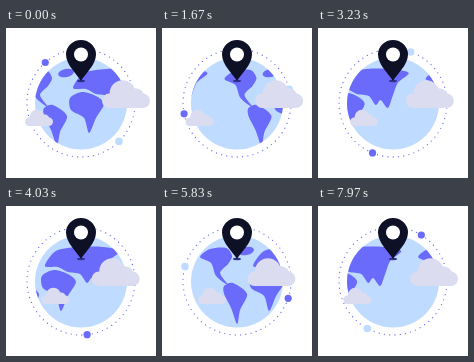
Animation of 150x150 px, one loop 8 s. Source, as an HTML page with a canvas:

```html
<!DOCTYPE html>
<html lang="en">
<head>
<meta charset="utf-8">
<title>Spinning globe</title>
<style>
  html, body { margin: 0; width: 100%; height: 100%; overflow: hidden; background: #fff; }
  canvas { display: block; width: 150px; height: 150px; }
</style>
</head>
<body>
<canvas id="stage"></canvas>
<script>
const SIZE = 150, LOOP = 8000;
const CX = 75, CY = 75, GLOBE_Y = 75.5, GLOBE_R = 46, ORBIT_R = 54;
const MAP_W = 145, SPIN_MS = 5000, DRIFT_MS = 10000, HOP_MS = 2000;
const SEA = '#bfdbff', LAND = '#6a6bfa', CLOUD = '#dcdcf0', INK = '#0e1026';
const TAU = Math.PI * 2;

const canvas = document.getElementById('stage');
const ctx = canvas.getContext('2d');
const ratio = window.devicePixelRatio || 1;
canvas.width = canvas.height = SIZE * ratio;

// Closed Catmull-Rom curve through a few coast points.
function coast(text) {
  const pts = text.split(' ').map(p => p.split(',').map(Number));
  const at = i => pts[(i + pts.length) % pts.length];
  const handle = (i, dir) => at(i).map((v, k) => v + dir * (at(i + 1)[k] - at(i - 1)[k]) / 7);
  const path = new Path2D();
  path.moveTo(...at(0));
  pts.forEach((_, i) => path.bezierCurveTo(...handle(i, 1), ...handle(i + 1, -1), ...at(i + 1)));
  return path;
}

const land = new Path2D();
land.ellipse(60, 45, 8, 4, -0.2, 0, TAU);
[
  '14,51 24,43 40,42 46,50 42,58 34,67 42,79 30,70 25,57',
  '38,80 47,77 61,88 54,104 51,118 45,102 38,88',
  '64,70 76,64 90,68 98,76 90,90 83,105 78,90 65,82',
  '67,60 78,45 100,41 125,41 142,45 131,55 126,68 121,80 114,72 109,77 102,68 90,66 80,61'
].forEach(text => land.addPath(coast(text)));

// The pin's tip sits at the origin.
const pin = new Path2D('M0 0C-4 -7 -15 -16 -15 -26.5A15 14.5 0 0 1 15 -26.5C15 -16 4 -7 0 0Z');

function disc(x, y, r, color) {
  ctx.fillStyle = color;
  ctx.beginPath();
  ctx.arc(x, y, r, 0, TAU);
  ctx.fill();
}

const ease = p => (1 - Math.cos(Math.PI * Math.min(1, Math.max(0, p)))) / 2;

function drawOrbit(t) {
  const turn = TAU * (0.635 - t / DRIFT_MS);
  const place = (angle, r, color) =>
    disc(CX + ORBIT_R * Math.cos(angle), CY + ORBIT_R * Math.sin(angle), r, color);
  const dots = 64;
  for (let i = 0; i < dots; i++) place(turn + TAU * i / dots, 0.65, LAND);
  place(turn, 3.6, LAND);
  place(turn + TAU * 0.491, 3.8, SEA);
}

function drawGlobe(t) {
  disc(CX, GLOBE_Y, GLOBE_R, SEA);
  ctx.save();
  ctx.clip();
  ctx.fillStyle = LAND;
  ctx.translate(MAP_W * (t / SPIN_MS % 1) - MAP_W, 0);
  for (let i = 0; i < 3; i++) {
    ctx.fill(land);
    ctx.translate(MAP_W, 0);
  }
  ctx.restore();
}

function drawPin(t) {
  const p = t % HOP_MS;
  const lift = p < 400 ? ease((p - 200) / 200) : 1 - ease((p - 400) / 500);
  ctx.save();
  ctx.globalAlpha = 1 - lift;
  ctx.fillStyle = '#30318c';
  ctx.beginPath();
  ctx.ellipse(CX, 53, 4, 1.2, 0, 0, TAU);
  ctx.fill();
  ctx.globalAlpha = 1;
  ctx.translate(CX, 53 - 6 * lift);
  ctx.scale(1, 1 + 0.12 * lift);
  ctx.fillStyle = INK;
  ctx.fill(pin);
  disc(0, -26.5, 7, '#fff');
  ctx.restore();
}

// A rounded bar with two humps, all sized from the cloud's width.
function drawCloud(x, bottom, w) {
  const barH = w * 0.3;
  ctx.fillStyle = CLOUD;
  ctx.beginPath();
  ctx.roundRect(x, bottom - barH, w, barH, barH / 2);
  ctx.fill();
  disc(x + w * 0.43, bottom - w * 0.31, w * 0.27, CLOUD);
  disc(x + w * 0.7, bottom - w * 0.23, w * 0.18, CLOUD);
}

function draw(t) {
  ctx.setTransform(ratio, 0, 0, ratio, 0, 0);
  ctx.fillStyle = '#fff';
  ctx.fillRect(0, 0, SIZE, SIZE);
  const sway = Math.cos(TAU * t / DRIFT_MS);
  drawOrbit(t);
  drawGlobe(t);
  drawPin(t);
  drawCloud(28 - 9 * sway, 98, 28);
  drawCloud(90.3 + 5.7 * sway, 80, 48);
}

const start = performance.now();
function tick() {
  draw((performance.now() - start) % LOOP);
  requestAnimationFrame(tick);
}
tick();
</script>
</body>
</html>
```
